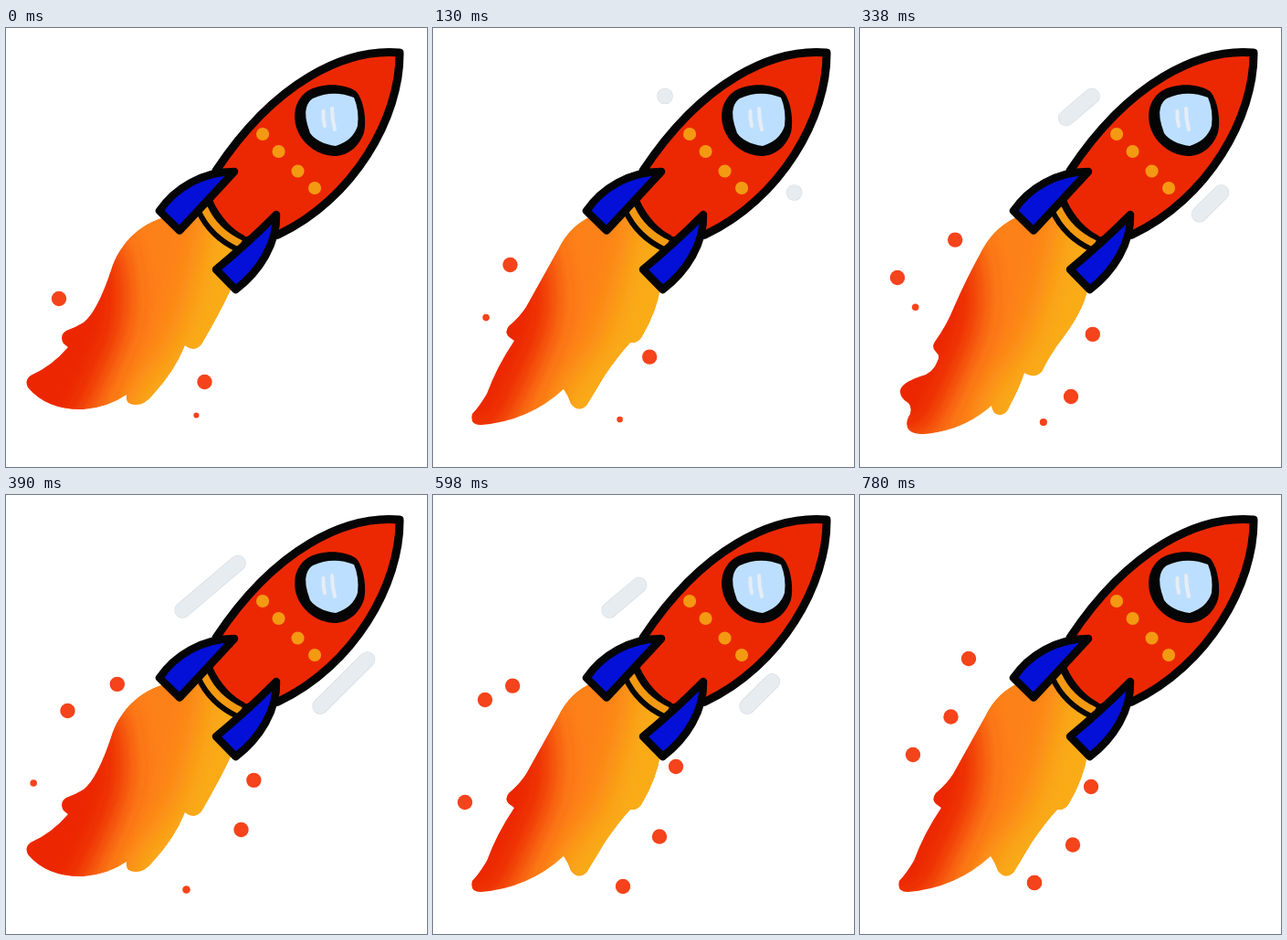
An HTML page that plays this animation: 461 by 480 pixels, repeating every 910 ms.

```html
<!DOCTYPE html>
<html lang="en">
<head>
<meta charset="utf-8">
<title>Rocket</title>
<style>
  html, body { margin: 0; width: 100%; height: 100%; overflow: hidden; background: #fff; }
  svg { display: block; width: 100vw; height: 100vh; }
  .ink { stroke: #050505; stroke-width: 9; stroke-linejoin: round; }
  .fin { fill: #0410d8; stroke-width: 8.500; }
  .spark { fill: #f5431b; }
  .streak { stroke-linecap: round; }
</style>
</head>
<body>
<svg viewBox="0 0 461 480">
  <defs>
    <filter id="soft" x="-30%" y="-30%" width="160%" height="160%">
      <feGaussianBlur stdDeviation="16"/>
    </filter>
  </defs>

  <g id="steps"></g>

  <g id="rocket">
    <path class="ink" fill="#ec2803" d="M431 27C372 22 295 58 230 156L222 190Q236 220 262 233L298 226C381 187 432 97 431 27Z"/>
    <path fill="#050505" d="M330 69C344 60 370 60 383 69C392 78 395 102 392 114C387 130 374 140 359 140C342 139 328 129 321 116C313 101 314 80 330 69Z"/>
    <path fill="#bddfff" d="M336 77Q358 67 381 76Q387 90 385 107Q380 123 361 129Q341 126 333 115Q326 96 329 87Q331 80 336 77Z"/>
    <path fill="none" stroke="#e6edf4" stroke-width="4" stroke-linecap="round" d="M347.500 91Q347 99 349 107M357 88Q357 100 360 111"/>
    <path id="rivets" fill="none" stroke="#f39a12" stroke-width="14" stroke-linecap="round" d="M281 116h.1M298.500 135h.1M319.500 156.500h.1M338 175h.1"/>
    <g fill="none">
      <path stroke="#050505" stroke-width="20" d="M217 197Q229 223 257 236"/>
      <path stroke="#f39a12" stroke-width="8" d="M217 197Q229 223 257 236"/>
    </g>
    <path class="ink fin" d="M250 157C215 157 185 175 168 200L190 221.500Q227 182 250 157Z"/>
    <path class="ink fin" d="M296 204Q264 236 230 264L251.500 286C278 266 297 235 296 204Z"/>
  </g>
</svg>

<script>
const STEP = 130, COUNT = 7;

const flames = [
  'M185 205C150 208 124 235 115 265Q100 310 85 322Q75 328 66 331Q58 336 63 345L68 349Q50 370 27 380Q20 385 24 393Q45 418 85 417Q112 415 132 401Q130 412 142 412Q152 412 160 402Q185 375 196 347Q206 355 214 346Q235 310 247 284L250 225L212 195Z',
  'M175 205Q150 215 137 242Q116 280 102 305Q95 316 83 326Q77 334 85 339L89 342Q70 370 59 400Q50 415 43 422Q40 434 52 434Q105 430 143 395Q148 402 151 411Q159 421 168 413Q176 400 188 380Q203 358 216 344Q225 345 229 337Q245 310 249 284L250 225L212 195Z',
  'M175 205Q148 216 134 242Q116 275 103 305Q95 325 82 343Q78 349 83 354Q88 358 85 364Q80 378 66 381Q45 388 44 397Q44 405 53 410Q57 414 55 422Q48 433 54 440Q62 447 85 442Q118 436 144 413Q145 423 154 423Q161 422 164 413Q174 395 180 377Q190 384 199 376Q205 363 216 347Q245 310 249 286L250 225L212 195Z'
];
const red = 'M122 230Q140 295 126 338Q108 385 74 450H-50V230Z';
const amber = 'M224 180Q206 290 182 345Q155 380 135 410V460H310V180Z';

// Sparks that drift up along the flame: first step, steps alive, x, y
const drifters = [
  [0, 4, 58, 296], [2, 3, 41, 273], [6, 5, 191, 424], [2, 2, 231, 403],
  [4, 1, 35, 336], [4, 1, 57, 224], [5, 1, 262, 424]
];
// Bursts of three sparks on a bowed line: step, then both ends
const bursts = [
  [4, 266, 297, 208, 428],
  [5, 148, 194, 35, 272], [5, 275, 336, 231, 400],
  [6, 119, 179, 58, 284], [6, 253, 319, 191, 424]
];
// Speed lines run from a to b
const lines = [
  { a: [254, 74.5], b: [193, 126] },
  { a: [395.5, 180], b: [344, 231] }
];

const svg = document.querySelector('svg');
const defs = svg.querySelector('defs');

function add(parent, tag, attrs = {}) {
  const el = document.createElementNS('http://www.w3.org/2000/svg', tag);
  for (const k in attrs) el.setAttribute(k, attrs[k]);
  return parent.appendChild(el);
}

const mix = (a, b, t) => a + (b - a) * t;
const clamp = t => Math.min(1, Math.max(0, t));

let seed = 7;
const rand = () => (seed = seed * 16807 % 2147483647) / 2147483647;
rand();

const spark = (g, cx, cy, r = 8.2) => add(g, 'circle', { class: 'spark', cx, cy, r });

function drawSparks(g, step) {
  for (const [first, life, x, y] of drifters) {
    const age = (step - first + COUNT) % COUNT;
    const way = age ** 0.8;
    if (age < life) spark(g, x + 26.5 * way, y - 37 * way);
  }
  for (const [at, x0, y0, x1, y1] of bursts) {
    if (at !== step) continue;
    for (const t of [0, 0.5, 1]) {
      const bow = 11 * Math.sin(Math.PI * t);
      spark(g, mix(x0, x1, t) + bow, mix(y0, y1, t) + bow);
    }
  }
  // Small flecks beside the flame while it gathers strength
  if (step < 4) spark(g, mix(190, 210, rand()), mix(418, 437, rand()), mix(2.5, 5, rand()));
  if (step > 0 && step < 4) spark(g, mix(28, 68, rand()), mix(300, 322, rand()), 3.8);
}

// The tail runs ahead for two steps, then the head follows it
function drawLines(g, step) {
  if (step < 1 || step > 5) return;
  const tail = clamp((step - 1) / 2) ** 1.1;
  const head = clamp((step - 3) / 2) ** 1.1;
  for (const { a, b } of lines) {
    const ends = {
      class: 'streak',
      x1: mix(a[0], b[0], head), y1: mix(a[1], b[1], head),
      x2: mix(a[0], b[0], tail) + 0.1, y2: mix(a[1], b[1], tail)
    };
    add(g, 'line', { ...ends, stroke: '#d3d9de', 'stroke-width': 17.4 });
    add(g, 'line', { ...ends, stroke: '#e7ecf1', 'stroke-width': 16.4 });
  }
}

flames.forEach((d, i) => {
  add(add(defs, 'clipPath', { id: 'clip' + i }), 'path', { d });
  const g = add(defs, 'g', { id: 'flame' + i, 'clip-path': `url(#clip${i})` });
  add(g, 'path', { d, fill: '#fd8119' });
  add(g, 'path', { d: amber, fill: '#f9ac18', filter: 'url(#soft)' });
  add(g, 'path', { d: red, fill: '#ec2503', filter: 'url(#soft)' });
});

for (let i = 0; i < COUNT; i++) {
  const g = add(document.getElementById('steps'), 'g', { opacity: 0 });
  // The three flames take turns; the last step falls back to the second
  add(g, 'use', { href: '#flame' + (i === COUNT - 1 ? 1 : i % 3) });
  drawSparks(g, i);
  drawLines(g, i);

  const key = (opacity, offset) => ({ opacity, offset, easing: 'step-end' });
  const keys = [key(1, i / COUNT), key(0, (i + 1) / COUNT)];
  if (i > 0) keys.unshift(key(0, 0));
  if (i < COUNT - 1) keys.push(key(0, 1));
  g.animate(keys, { duration: STEP * COUNT, iterations: Infinity });
}
</script>
</body>
</html>
```
